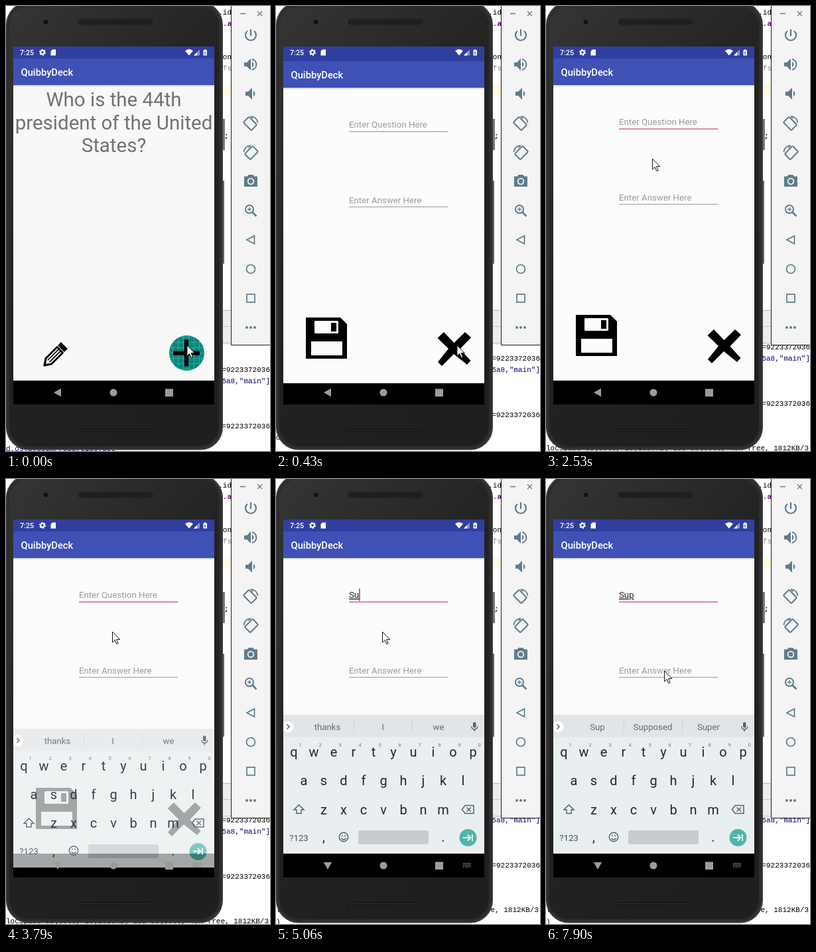
Write an HTML page that moves like this. It is 398 by 670 pixels and loops after 8000 ms.

```html
<!DOCTYPE html>
<html lang="en">
<head>
<meta charset="utf-8">
<title>Flash card app</title>
<style>
html, body { margin: 0; width: 100%; height: 100%; overflow: hidden; background: #fff; }
svg { display: block; width: 100%; height: 100%; font-family: Roboto, sans-serif; }
text { white-space: pre; }
.mid { text-anchor: middle; }
.end { text-anchor: end; }
.code { font: 11px "Liberation Mono", monospace; }
.field { font-size: 13.26px; }
.hint { fill: #9b9b9b; }
.ask { font-size: 29.5px; fill: #737373; text-anchor: middle; }
.tool { fill: none; stroke: #5f7d8b; stroke-width: 2; }
.tool .f { fill: #5f7d8b; stroke: none; }
.key { font-size: 20px; fill: #1d2a30; text-anchor: middle; }
.num { font-size: 7.5px; fill: #6f7a7f; text-anchor: middle; }
.word { font-size: 13.26px; fill: #626d73; text-anchor: middle; }
.line { fill: none; stroke: #56646b; stroke-width: 1.5; }
</style>
</head>
<body>
<svg viewBox="0 0 398 670" preserveAspectRatio="none">
<defs>
  <clipPath id="screen"><rect x="11" y="61" width="303" height="539"/></clipPath>
  <clipPath id="console"><rect y="509" width="398" height="161"/></clipPath>
  <clipPath id="disc"><circle cx="272.5" cy="522.5" r="26.5"/></clipPath>
  <pattern id="holes" width="3" height="3" patternUnits="userSpaceOnUse">
    <rect width="3" height="3" fill="#2c2c2c"/><circle cx="1.5" cy="1.5" r="1.1" fill="#070707"/>
  </pattern>
  <pattern id="grid" x="3" y="2" width="8" height="8" patternUnits="userSpaceOnUse">
    <rect width="8" height="8" fill="#00897b"/><path d="M0 .5H8M.5 0V8" stroke="#4aaba0" stroke-width=".8"/>
  </pattern>
  <linearGradient id="shade" x2="0" y2="1">
    <stop stop-color="#000" stop-opacity=".2"/><stop offset="1" stop-color="#000" stop-opacity="0"/>
  </linearGradient>
  <linearGradient id="body" x2=".6" y2="1">
    <stop stop-color="#353535"/><stop offset=".5" stop-color="#232323"/><stop offset="1" stop-color="#1f1f1f"/>
  </linearGradient>
  <g id="chrome">
    <rect x="11" y="61" width="303" height="18" fill="#303f9f"/>
    <rect x="11" y="79" width="303" height="40" fill="#3f51b5"/>
    <rect x="11" y="119" width="303" height="3" fill="url(#shade)"/>
    <text x="22.5" y="105" font-size="14.74" font-weight="500" fill="#fff">QuibbyDeck</text>
    <rect x="11" y="564" width="303" height="36" fill="#000"/>
  </g>
  <g id="turn">
    <rect x="-6" y="-8.5" width="12" height="17" rx="1.5" transform="translate(-1 1) rotate(-45)"/>
    <path d="M0-10A10.500 10.500 0 0 1 10.500 0M0-10L3.500-6.500" stroke-width="1.600"/>
  </g>
</defs>

<!-- code window behind -->
<rect width="398" height="670" fill="#fff"/>
<rect x="320" y="118" width="20" height="17" fill="#fffae3"/>
<rect x="320" y="457" width="20" height="53" fill="#ededed"/>
<path d="M320 458.500h20M320 482.500h20M320 507.500h20" stroke="#c4c4c4"/>
<g class="code">
  <text class="end" x="340" y="13">R.id</text>
  <text class="end" x="340" y="30" fill="#660e7a" font-weight="bold">.a</text>
  <text class="end" x="340" y="80">on</text>
  <text class="end" x="340" y="97" fill="#8a8a8a">ffs</text>
  <text x="329" y="199" font-weight="bold">;</text>
</g>
<g clip-path="url(#console)">
  <g id="log" class="code">
    <text class="end" x="398" y="551">=9223372036</text>
    <text class="end" x="398" y="568" fill="#00007f">5a8,"main"]</text>
    <text class="end" x="398" y="636">=9223372036</text>
    <text x="0" y="670" fill="#00007f">d.os.SystemProperties.get</text>
    <text x="0" y="703">locSpace objects, 15(1020KB) LOS objects, 49% free, 1812KB/3</text>
    <text x="0" y="721">)</text>
  </g>
</g>

<!-- phone -->
<path d="M328 170V217" stroke="#777" stroke-width="4"/>
<path d="M327.500 263V388" stroke="#666" stroke-width="3"/>
<rect x="0" y="-6" width="327" height="674.500" rx="34" fill="#3b3b3b"/>
<rect x="1.500" y="-4" width="323.500" height="670.500" rx="33" fill="#2d2d2d"/>
<rect x="5" y="0" width="316" height="663" rx="30" fill="url(#body)"/>
<circle cx="60" cy="24" r="4" fill="#111" stroke="#333"/>
<rect x="109" y="19.500" width="112" height="9" rx="4" fill="url(#holes)"/>
<rect x="104" y="637" width="118" height="9.500" rx="4" fill="url(#holes)"/>

<g clip-path="url(#screen)">
  <g id="home">
    <rect x="11" y="61" width="303" height="539" fill="#f8f8f8"/>
    <use href="#chrome"/>
    <text class="ask" x="162.5" y="151">Who is the 44th</text>
    <text class="ask" x="162.5" y="185.5">president of the United</text>
    <text class="ask" x="162.5" y="220">States?</text>
    <g transform="translate(56.500 542.500) rotate(-45)" fill="none" stroke="#000" stroke-width="3">
      <path d="M2 0L11-6H35V6H11Z" stroke-linejoin="round"/>
      <path d="M11-2H35M11 2H35" stroke-width="1.6"/>
      <path d="M38-6.500H44V6.500H38Z" fill="#000" stroke-width="1"/>
      <path d="M0 0L6-3V3Z" fill="#000" stroke="none"/>
    </g>
    <rect x="246" y="496" width="53" height="53" fill="url(#grid)" clip-path="url(#disc)"/>
    <path d="M252 522.500H292M272 502.500V542.500" stroke="#000" stroke-width="6.500"/>
  </g>

  <g id="form">
    <rect x="11" y="61" width="303" height="539" fill="#fcfcfc"/>
    <use href="#chrome"/>
    <text id="hint" class="field hint" x="110" y="179">Enter Question Here</text>
    <text id="typed" class="field" x="110" y="179" fill="#212121" text-decoration="underline"></text>
    <rect id="rule" x="110" y="184.500" width="149" height="1.200"/>
    <rect id="caret" y="165" width="1.500" height="18.500" fill="#d81b60"/>
    <text class="field hint" x="110" y="292.500">Enter Answer Here</text>
    <rect x="110" y="298" width="149" height="1" fill="#9a9a9a"/>
    <path d="M45 465H97L107 475V527H45Z"/>
    <rect x="58" y="470" width="36" height="19" rx="1.500" fill="#fcfcfc"/>
    <rect x="83" y="473" width="8" height="13"/>
    <rect x="53" y="501" width="47" height="21" fill="#fcfcfc"/>
    <path d="M243.500 496L253 487 268.500 503 285 487 294 495 277.500 512.500 293.500 530 288 536 268 520 250 538 244 532 260 512Z"/>
  </g>

  <g id="plate">
    <rect x="11" y="355" width="303" height="209" fill="#e9eef0"/>
    <rect x="11" y="355" width="303" height="33.500" fill="#e1e5e8"/>
    <path d="M117.500 364V382M205.500 364V382" stroke="#cdd2d5"/>
    <circle cx="18" cy="373" r="8.500" fill="#fff"/>
    <rect x="124" y="529" width="106" height="21" rx="2.500" fill="#c7ccd0"/>
    <circle cx="289.500" cy="540" r="13" fill="#4db6ac"/>
  </g>
  <g id="marks">
    <path class="line" d="M16.500 369.500L20 373 16.500 376.500"/>
    <rect x="297" y="366" width="4.500" height="8.500" rx="2.200" fill="#56646b"/>
    <path class="line" d="M294.700 372.500a4.500 4.500 0 0 0 9 0M299.200 377V380"/>
    <g id="words"></g>
    <g id="keys"></g>
    <path id="shift" class="line" d="M34.500 490.500L42 498H38V503.500H31V498H27Z"/>
    <path class="line" d="M280.500 497.500L285 491.500H298V503.500H285ZM287.500 494.500L294 500.500M294 494.500L287.500 500.500"/>
    <text x="34.500" y="544.500" class="mid" font-size="13.300" fill="#46545b">?123</text>
    <text class="key" x="72" y="546">,</text>
    <text class="key" x="252" y="546">.</text>
    <circle class="line" cx="102" cy="539" r="6.700"/>
    <path class="line" d="M98.500 541q3.500 4 7 0M99 537h2M103 537h2"/>
    <path d="M282 540H293M289 535.500L293.500 540 289 544.500M296 535V545" fill="none" stroke="#fff" stroke-width="1.800"/>
  </g>

  <g fill="#9c9c9c">
    <path id="back" d="M-6 0L5-6.200V6.200Z"/>
    <circle cx="162" cy="582" r="5.500"/>
    <rect x="240" y="576.500" width="12" height="11.500"/>
    <path id="kbIcon" d="M282 579H294M282 581.500H294M282 584H284M285 584H291M292 584H294" stroke="#8a8a8a" stroke-width="1.300" stroke-dasharray="1.300 .8"/>
  </g>
  <g fill="#fff">
    <text x="21" y="73.500" font-size="10.700" font-weight="500">7:25</text>
    <circle cx="55" cy="69.800" r="2.800" fill="none" stroke="#fff" stroke-width="2"/>
    <circle cx="55" cy="69.800" r="4.400" fill="none" stroke="#fff" stroke-width="1.400" stroke-dasharray="2.200 2.400"/>
    <path d="M67.500 68L70 65.500H75V74.500H67.500Z"/>
    <path d="M270 67.500Q276 62.500 282 67.500L276 74.500Z"/>
    <path d="M283 74.500H292V65.500Z" opacity=".45"/><path d="M283 74.500H288V69.500Z"/>
    <path d="M297.500 66.500H299V65.500H301.500V66.500H303V74.500H297.500Z"/>
    <path d="M301 67.500L299 71H301.500L299.500 73.500" fill="none" stroke="#303f9f" stroke-width=".9"/>
  </g>
</g>

<!-- side toolbar -->
<rect x="339" y="-1" width="60" height="512" fill="#f4f4f4"/>
<path d="M339.500 0V510.500H398" fill="none" stroke="#1a1a1a"/>
<g class="tool">
  <path d="M353 11.500H361M379 8L386 15M386 8L379 15" stroke-width="1.300"/>
  <path transform="translate(369 44)" d="M0-9V1M-5-6.500A8 8 0 1 0 5-6.500" stroke-width="2.200"/>
  <g transform="translate(369 88)">
    <path class="f" d="M-10-3H-6L0-9V9L-6 3H-10ZM2-4.500Q7 0 2 4.500Z"/><path d="M2-8A8.200 8.200 0 0 1 2 8"/>
  </g>
  <path class="f" transform="translate(369 132)" d="M-8-3H-4L2-9V9L-4 3H-8ZM4-4.500Q9 0 4 4.500Z"/>
  <use href="#turn" transform="translate(369 176)"/>
  <use href="#turn" transform="translate(369 220) scale(-1 1)"/>
  <g transform="translate(369 263)">
    <path class="f" d="M-10-6.500H-5.500L-3-9H3L5.500-6.500H10V9H-10Z"/>
    <circle r="4.300" cy="1" stroke="#f4f4f4" stroke-width="1.800"/>
  </g>
  <g transform="translate(369 308)">
    <circle cx="-2" cy="-2" r="6"/><path d="M2.500 2.500L8.500 8.500" stroke-width="2.600"/>
    <path d="M-5-2H1M-2-5V1" stroke-width="1.400"/>
  </g>
  <path d="M363 352L374.500 346V358Z" stroke-width="1.700"/>
  <circle cx="369" cy="396" r="6.500" stroke-width="1.700"/>
  <rect x="363" y="434" width="12" height="12" stroke-width="1.700"/>
  <path d="M363 484h.01M369 484h.01M375 484h.01" stroke-width="4" stroke-linecap="round"/>
</g>

<path id="mouse" d="M0 0V16L3.700 12.500 6.300 18.500 8.700 17.500 6.100 11.600H11.300Z" fill="#fff" stroke="#111"/>
</svg>

<script>
const LOOP = 8000;
const $ = id => document.getElementById(id);

function label(parent, cls, x, y, str = '') {
  const el = document.createElementNS('http://www.w3.org/2000/svg', 'text');
  el.setAttribute('class', cls);
  el.setAttribute('x', x);
  el.setAttribute('y', y);
  el.textContent = str;
  parent.append(el);
  return el;
}

// keyboard letters: [row, first key centre, baseline]
const keys = [];
[['qwertyuiop', 27, 418], ['asdfghjkl', 42, 461], ['zxcvbnm', 72, 504.5]].forEach(([row, x, y], r) => {
  [...row].forEach((ch, i) => {
    keys.push({ ch, el: label($('keys'), 'key', x + i * 30, y, ch) });
    if (r === 0) label($('keys'), 'num', x + i * 30 + 9.5, 402.5, (i + 1) % 10);
  });
});
const words = [77.5, 161, 245].map(x => label($('words'), 'word', x, 378));

// step tables: [time, ...values]
const steps = {
  mouse: [[0, 273, 511], [700, 262, 470], [840, 225, 345], [980, 180, 210], [1120, 156, 134],
    [1270, 155.5, 160], [1550, 155, 163], [1670, 154.5, 168], [2230, 157, 186], [2370, 160, 222],
    [2530, 160.5, 230], [7630, 163, 243], [7770, 175, 276], [7900, 178.5, 289]],
  form: [[0, 0, 40], [150, .2, 30], [290, .9, 11], [430, 1, 4], [570, 1, 0]],
  log: [[0, 0], [290, -17], [2230, -34], [4490, -51]],
  caret: [[0, 0], [1950, 1], [2530, 0], [3220, 1], [3790, 0], [4060, 1], [5800, 0],
    [6230, 1], [6790, 0], [7350, 1], [7900, 0]],
  focus: [[0, '#9a9a9a'], [1950, '#d23f70']],
  back: [[0, 0], [3220, -30], [3360, -65], [3500, -90]],
  plate: [[0, 0, 40], [3790, .7, 21], [3930, .95, 4], [4060, 1, 0]],
  marks: [[0, 0, 40], [3790, .88, 20.5], [3930, 1, 4], [4060, 1, 0]],
  caps: [[0, false], [4490, true], [4790, false]],
  typed: [[0, ''], [4490, 'S'], [4930, 'Su'], [5370, 'Sup']],
  words: [[0, 'thanks', 'I', 'we'], [5370, 'Sup', 'Supposed', 'Super']]
};

function at(name, t) {
  let hit = steps[name][0];
  for (const row of steps[name]) if (row[0] <= t) hit = row;
  return hit.slice(1);
}

function move(id, x, y) { $(id).setAttribute('transform', `translate(${x} ${y})`); }

function layer(id, t) {
  const [alpha, y] = at(id, t);
  $(id).setAttribute('opacity', alpha);
  move(id, 0, y);
}

function setText(el, str) { if (el.textContent !== str) el.textContent = str; }

function draw(t) {
  ['form', 'plate', 'marks'].forEach(id => layer(id, t));
  move('mouse', ...at('mouse', t));
  move('log', 0, at('log', t)[0]);

  const [text] = at('typed', t);
  setText($('typed'), text);
  $('hint').setAttribute('opacity', text ? 0 : 1);
  $('caret').setAttribute('x', 110 + (text ? $('typed').getComputedTextLength() : 0));
  $('caret').setAttribute('opacity', at('caret', t)[0]);
  $('rule').setAttribute('fill', at('focus', t)[0]);

  const [caps] = at('caps', t);
  keys.forEach(k => setText(k.el, caps ? k.ch.toUpperCase() : k.ch));
  $('shift').style.fill = caps ? '#56646b' : 'none';
  at('words', t).forEach((w, i) => setText(words[i], w));

  $('back').setAttribute('transform', `translate(78 582) rotate(${at('back', t)[0]})`);
  $('kbIcon').setAttribute('opacity', t >= 3220 ? 1 : 0);
}

const start = performance.now();
function tick() {
  draw((performance.now() - start) % LOOP);
  requestAnimationFrame(tick);
}
tick();
</script>
</body>
</html>
```
